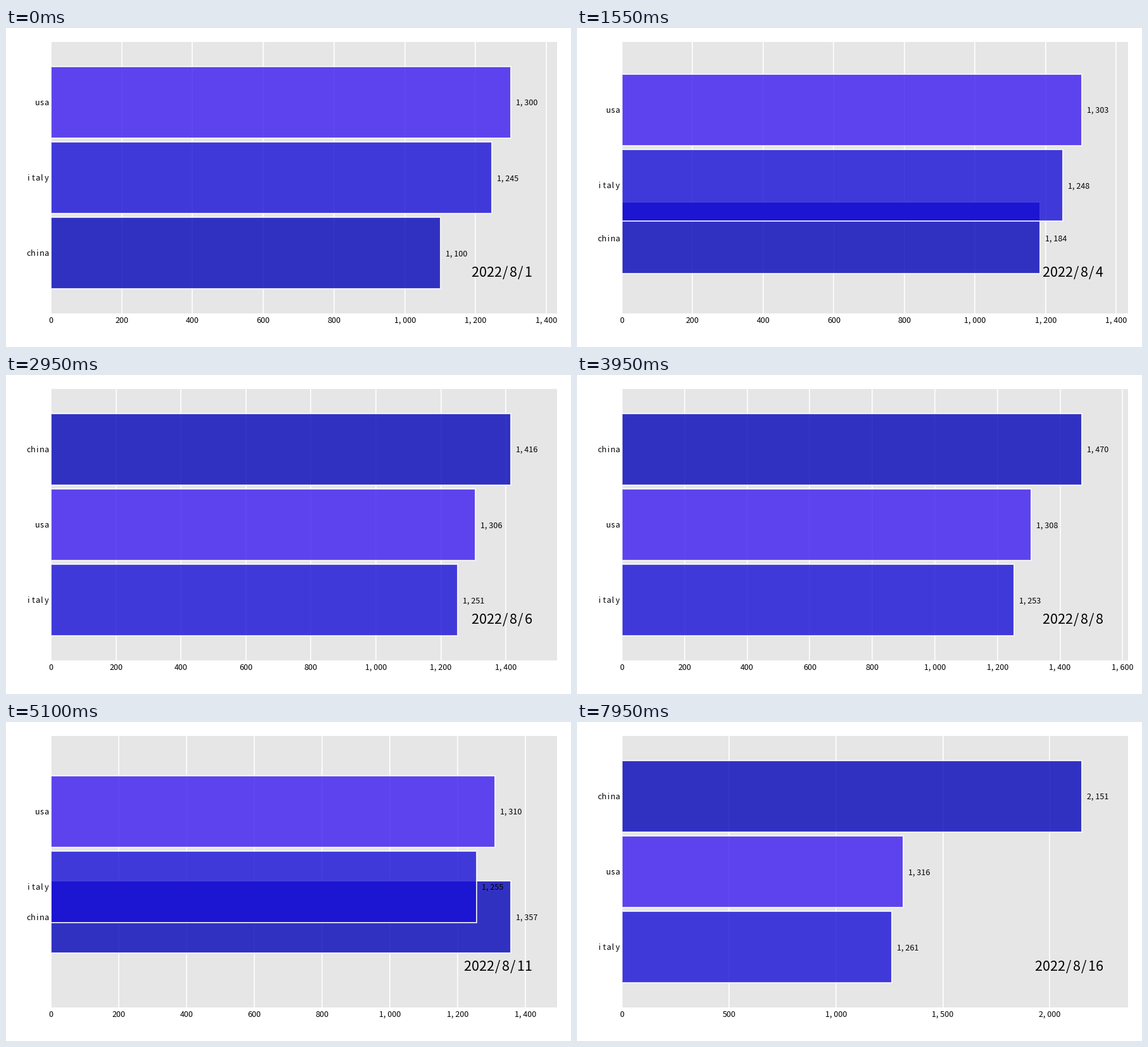
A matplotlib script that plays this animation: 892 px wide and 504 px high, repeating every 8000 ms.

```python
import numpy as np
import matplotlib.pyplot as plt
from matplotlib.animation import FuncAnimation
from matplotlib.patches import Rectangle
from matplotlib.ticker import MaxNLocator

W, H, DPI = 892, 504, 100
LEFT, RIGHT, TOP, BOTTOM = 71, 870, 22, 451
STEPS, PERIODS = 10, 16
PX = 72 / DPI  # points per pixel
FONT = "Noto Sans CJK JP"

days = np.arange(PERIODS + 1)
china = [1100, 1200, 1270, 1170, 1314, 1380, 1420, 1600, 1456, 1230, 1121, 2300]
series = {
    "china": np.array(china + list(range(2147, 2152)), float),
    "italy": 1245.0 + days,
    "usa": 1300.0 + days,
}
colors = {
    "china": (4 / 255, 4 / 255, 184 / 255),
    "italy": (23 / 255, 14 / 255, 214 / 255),
    "usa": (59 / 255, 26 / 255, 239 / 255),
}
values = np.array(list(series.values()))
ranks = values.argsort(axis=0).argsort(axis=0) + 1.0
slot = (BOTTOM - TOP) / (len(series) + 0.6)
locator = MaxNLocator(9, steps=[1, 2, 2.5, 5, 10])

fig = plt.figure(figsize=(W / DPI, H / DPI), dpi=DPI, facecolor="white")
ax = fig.add_axes([0, 0, 1, 1])
ax.set(xlim=(0, W), ylim=(H, 0))
ax.axis("off")
plot_area = ax.add_patch(Rectangle((LEFT, TOP), RIGHT - LEFT, BOTTOM - TOP,
                                   fc="0.9", ec="none", zorder=0))
drawn = []


def at(table, t):
    """Linear blend between neighbouring periods."""
    i = int(t)
    return table[:, i] + (table[:, i + 1] - table[:, i]) * (t - i)


def label(x, y, text, size=12.6, ha="left"):
    drawn.append(ax.text(x, y, text, fontsize=size * PX, family=FONT,
                         ha=ha, va="baseline", color="black", zorder=5))


def monospaced(right, y, text, pitch, size):
    for i, char in enumerate(reversed(text)):
        label(right - pitch * (i + 0.5), y, char, size, "center")


def number(v):
    return f"{v:,.0f}".replace(",", ", ")


def draw(frame):
    while drawn:
        drawn.pop().remove()
    t = frame / STEPS
    lengths, places = at(values, t), at(ranks, t)
    limit = lengths.max() * 1.1
    scale = (RIGHT - LEFT) / limit

    for tick in locator.tick_values(0, limit):
        if 0 <= tick <= limit:
            x = LEFT + tick * scale
            drawn.extend(ax.plot([x, x], [TOP, BOTTOM], color="white", lw=1.6 * PX,
                                 solid_capstyle="butt", zorder=1,
                                 clip_path=plot_area))
            label(x, 466, number(tick), ha="center")

    for name, length, place in zip(series, lengths, places):
        y = BOTTOM - (place - 0.2) * slot
        bar = Rectangle((LEFT, y - 0.475 * slot), length * scale, 0.95 * slot,
                        fc=colors[name], ec="white", lw=2 * PX, alpha=0.8, zorder=2)
        drawn.append(ax.add_patch(bar))
        bar.set_clip_path(plot_area)
        monospaced(67.5, y + 4.8, name, 7, 12.6)
        label(LEFT + length * scale + 8, y + 4.8, number(length))

    monospaced(830.5, 393, f"2022/8/{int(t) + 1}", 12, 21.6)
    return drawn


anim = FuncAnimation(fig, draw, frames=STEPS * PERIODS, interval=50,
                     init_func=lambda: draw(0), repeat=True, repeat_delay=0)
plt.show()
```
